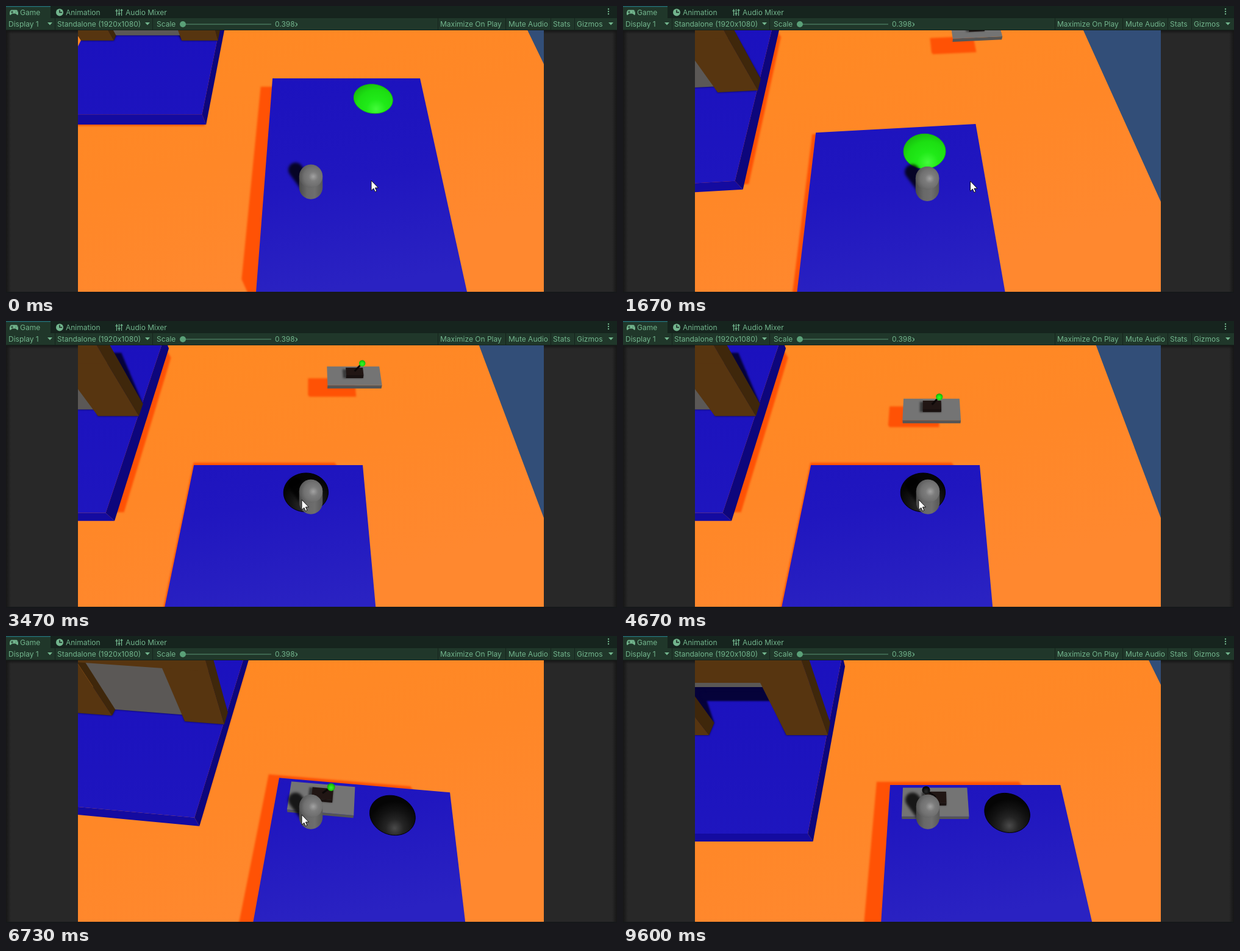
Animation, 1002 px wide and 472 px high, one loop 9.67 s. Source, as an HTML page with a canvas:

```html
<!DOCTYPE html>
<html lang="en">
<head>
<meta charset="utf-8">
<title>Game view</title>
<style>
  html, body { margin: 0; width: 100%; height: 100%; overflow: hidden; background: #282828; }
  canvas, svg { position: absolute; left: 0; top: 0; }
  text { font: 12px Inter, sans-serif; fill: #72b58d; }
</style>
</head>
<body>
<canvas id="view" width="1002" height="472"></canvas>
<svg width="1002" height="472" viewBox="0 0 1002 472">
  <defs>
    <linearGradient id="edge"><stop stop-color="#161616"/><stop offset="1" stop-color="#161616" stop-opacity="0"/></linearGradient>
    <linearGradient id="under" x2="0" y2="1"><stop stop-color="#161616"/><stop offset="1" stop-color="#161616" stop-opacity="0"/></linearGradient>
  </defs>
  <rect y="40" width="8" height="430" fill="url(#edge)"/>
  <rect y="40" width="8" height="430" fill="url(#edge)" transform="matrix(-1 0 0 1 1002 0)"/>
  <path d="M0 40h118v6H0zM882 40h120v6H882z" fill="url(#under)"/>
  <path d="M0 470h1002v2H0z" fill="#15181a"/>
  <path d="M0 0h1002v20H0z" fill="#16241e"/>
  <path d="M0 0h73v20H0zM0 20h1002v19H0z" fill="#20372a"/>
  <path d="M0 0h73v1.5H0z" fill="#236b72"/>
  <path d="M0 39h1002v1H0zM73 19h929v1H73zM80 20h1v19h-1zM240 20h1v19h-1zM708 20h1v19h-1zM819 20h1v19h-1zM893 20h1v19h-1zM932 20h1v19h-1z" fill="#15231c"/>
  <g fill="#72b58d">
    <path d="M9 6.500h8c3 0 4 8 2 8.500-1.500 0-2-2.500-3.500-2.500h-5c-1.500 0-2 2.500-3.500 2.500-2-.5-1-8.500 2-8.500z"/>
    <circle cx="88" cy="10.500" r="6"/>
    <path d="M68 27h8l-4 4.500zM228 27h8l-4 4.500zM988 27h8l-4 4.500z"/>
    <circle cx="988" cy="5" r="1.200"/><circle cx="988" cy="9" r="1.200"/><circle cx="988" cy="13" r="1.200"/>
  </g>
  <path d="M8 10h4M10 8v4M15.500 10h1M18 9h.5" stroke="#20372a" fill="none"/>
  <path d="M88 6.500v4h4" stroke="#16241e" stroke-width="1.500" fill="none"/>
  <path d="M181.500 5v11M185.500 5v11M189.500 5v11M179.500 8h4M183.500 12.500h4M187.500 7h4" stroke="#72b58d" stroke-width="1.300" fill="none"/>
  <path d="M285 30h150" stroke="#3d6650" stroke-width="2"/>
  <circle cx="290" cy="30" r="5" fill="#5aa078"/>
  <text x="23" y="15">Game</text>
  <text x="98" y="15">Animation</text>
  <text x="196" y="15">Audio Mixer</text>
  <text x="4" y="34">Display 1</text>
  <text x="84" y="34">Standalone (1920x1080)</text>
  <text x="247" y="34">Scale</text>
  <svg x="441" y="20" width="37" height="19"><text y="14">0.398x</text></svg>
  <text x="712" y="34">Maximize On Play</text>
  <text x="824" y="34">Mute Audio</text>
  <text x="897" y="34">Stats</text>
  <text x="936" y="34">Gizmos</text>
  <path id="cursor" d="M0 0V16.500L3.800 13L6.300 18.500L8.800 17.400L6.400 12H11.500Z" fill="#fff" stroke="#111"/>
</svg>
<script>
const ctx = document.getElementById('view').getContext('2d');
const cursor = document.getElementById('cursor');
const LOOP = 9670, FOCAL = 595, PITCH = 58 * Math.PI / 180;
const SIN = Math.sin(PITCH), COS = Math.cos(PITCH);
const FLOOR = -3.4, SUN_X = -0.406, SUN_Z = 0.727;

// Rows are [time, ...values].
const CAMERA = [ // x, z, yaw in degrees, height, player screen offset x, y
  [730, 2.6, -17.8, 0, 17.88, 0, 0],
  [1200, 4.83, -16.44, 4.59, 18.12, 4, -5],
  [2270, 6.84, -11.5, 2.22, 18.2, -8, 15],
  [2900, 6.93, -11.94, 0, 17.88, 0, 0],
  [5700, 6.93, -11.94, 0, 17.88, 0, 0],
  [6730, 3.115, -11.85, -5.87, 17.88, 0, 0],
  [8000, 2.18, -11.53, -0.5, 17.88, 4, 1],
  [9600, 2.22, -11.59, 0, 17.88, 0, 0]
];
const LIFT = [[2900, 9.4, 10], [4670, 5.3, 5.36], [6500, 0.76, -0.2]];
const POINTER = [
  [400, 599, 287], [400, 588, 276], [530, 588, 276], [530, 599, 287],
  [1500, 599, 287], [2150, 487, 291], [3000, 485, 294], [6900, 485, 294],
  [7300, 525, 268], [8700, 525, 268], [9300, 42, 472], [9400, 42, 490]
];

const clamp = (v, lo, hi) => Math.min(hi, Math.max(lo, v));

// Interpolates rows: straight, or smooth without overshoot.
function track(rows, t, smooth) {
  const last = rows.length - 1;
  if (t <= rows[0][0]) return rows[0].slice(1);
  if (t >= rows[last][0]) return rows[last].slice(1);
  const i = rows.findIndex(r => r[0] > t) - 1;
  const a = rows[i], b = rows[i + 1], span = b[0] - a[0], u = (t - a[0]) / span;
  const slope = (j, k) => j < 0 || j >= last ? 0 : (rows[j + 1][k] - rows[j][k]) / (rows[j + 1][0] - rows[j][0]);
  const tangent = (j, k) => {
    const p = slope(j - 1, k), q = slope(j, k);
    return p * q > 0 ? 2 * p * q / (p + q) : 0;
  };
  return a.slice(1).map((from, n) => {
    const k = n + 1, d = b[k] - from;
    if (!smooth) return from + d * u;
    return from + d * u * u * (3 - 2 * u)
      + span * u * (1 - u) * ((1 - u) * tangent(i, k) - u * tangent(i + 1, k));
  });
}

let cam;
function project([x, y, z]) {
  const dx = x - cam.x, dy = y - cam.h, dz = z - cam.z;
  const c = Math.cos(cam.yaw), s = Math.sin(cam.yaw);
  const side = dx * c - dz * s, ahead = dx * s + dz * c;
  const scale = FOCAL / (ahead * COS - dy * SIN);
  return { x: 500 + side * scale, y: 255 - (dy * COS + ahead * SIN) * scale, scale };
}

function trace(points) {
  ctx.beginPath();
  for (const p of points) {
    const q = project(p);
    ctx.lineTo(q.x, q.y);
  }
  ctx.closePath();
}

function face(points, fill) {
  trace(points);
  ctx.fillStyle = fill;
  ctx.fill();
}

const flat = (r, y) => [[r.x0, y, r.z0], [r.x1, y, r.z0], [r.x1, y, r.z1], [r.x0, y, r.z1]];

function box(r, y0, y1, [top, front, right]) {
  if (cam.x > r.x1) face([[r.x1, y0, r.z0], [r.x1, y1, r.z0], [r.x1, y1, r.z1], [r.x1, y0, r.z1]], right);
  if (cam.z < r.z0) face([[r.x0, y0, r.z0], [r.x1, y0, r.z0], [r.x1, y1, r.z0], [r.x0, y1, r.z0]], front);
  face(flat(r, y1), top);
}

// Shadow of a box whose bottom and top lie low and high above the ground.
function shadow(r, low, high, ground, color) {
  const at = (x, z, h) => [x + SUN_X * h, ground, z + SUN_Z * h];
  ctx.filter = 'blur(1.5px)';
  face([at(r.x0, r.z0, low), at(r.x1, r.z0, low), at(r.x1, r.z1, low),
    at(r.x1, r.z1, high), at(r.x0, r.z1, high), at(r.x0, r.z0, high)], color);
  ctx.filter = 'none';
}

function gradient(x0, y0, x1, y1, ...colors) {
  const g = ctx.createLinearGradient(x0, y0, x1, y1);
  colors.forEach((c, i) => g.addColorStop(i / (colors.length - 1), c));
  return g;
}

function glow(x, y, r, ...colors) {
  const g = ctx.createRadialGradient(x, y, 0, x, y, r);
  colors.forEach((c, i) => g.addColorStop(i / (colors.length - 1), c));
  return g;
}

const MAIN = { x0: 0, x1: 10, z0: -15, z1: 0 };
const YARD = { x0: -14.28, x1: -4.28, z0: -3.14, z1: 11.8 };
const GATE = { x0: -14.28, x1: -4.22, z0: 3.84, z1: 4.9 };
const LEFT_POST = { ...GATE, x1: -11.86 }, RIGHT_POST = { ...GATE, x0: -6.88 };
const DOOR = { x0: -11.86, x1: -6.88, z0: 4.4, z1: 4.6 };
const BROWN = ['#5c3813', '#573510', '#3f270b'];
const GATE_TOP = 7, OPENING = 4.3;

function drawYard(open) {
  const blue = gradient(0, 40, 0, 470, '#1b11be', '#2018bf');
  const raised = 3.5 * open, dark = 'rgba(0,0,0,.78)';
  box(YARD, -1.05, 0, [blue, '#140ba0', '#0d067c']);
  ctx.save();
  trace(flat(YARD, 0));
  ctx.clip();
  ctx.beginPath();
  ctx.save();
  shadow(GATE, OPENING, GATE_TOP, 0, '#05023a');
  shadow(LEFT_POST, 0, OPENING, 0, '#05023a');
  shadow(RIGHT_POST, 0, OPENING, 0, '#05023a');
  shadow(DOOR, raised, OPENING, 0, '#05023a');
  ctx.restore();
  ctx.restore();
  box(LEFT_POST, 0, GATE_TOP, BROWN);
  box(DOOR, raised, raised + OPENING, ['#666', '#5b5856', '#444']);
  box(RIGHT_POST, 0, GATE_TOP, BROWN);
  face([[GATE.x0, OPENING, GATE.z0], [GATE.x1, OPENING, GATE.z0],
    [GATE.x1, GATE_TOP, GATE.z0], [GATE.x0, GATE_TOP, GATE.z0]], BROWN[1]);
}

function drawButton(pressed) {
  const center = [6.65, 0.05, -1.85], r = 1.26;
  const c = project(center), size = r * c.scale;
  const rim = Array.from({ length: 48 }, (_, i) => {
    const a = i * Math.PI / 24;
    return [center[0] + r * Math.cos(a), center[1], center[2] + r * Math.sin(a)];
  });
  face(rim, pressed
    ? glow(c.x + size * 0.1, c.y + size * 0.6, size * 1.2, '#4a4a4a', '#242424', '#121212', '#050505')
    : glow(c.x + size * 0.15, c.y + size * 0.55, size * 1.5, '#43fb3a', '#20ea18', '#1cdf12', '#16b60d'));
  ctx.strokeStyle = pressed ? '#000' : '#17b90d';
  ctx.lineWidth = 1;
  ctx.stroke();
}

function drawLift(rect, swing) {
  const { x0, z1 } = rect;
  box(rect, -0.28, 0.02, ['#747474', '#555', '#484848']);
  const bench = { x0: x0 + 1.3, x1: x0 + 2.5, z0: z1 - 1.2, z1: z1 - 0.45 };
  ctx.filter = 'blur(1.5px)';
  face(flat({ ...bench, x0: bench.x0 - 0.2, z1: bench.z1 + 0.15 }, 0.02), 'rgba(0,0,0,.5)');
  ctx.filter = 'none';
  box(bench, 0.02, 0.3, ['#211614', '#191110', '#100a09']);
  const foot = project([x0 + 1.9, 0.3, z1 - 0.8]);
  const knob = project([x0 + 2.36 - swing, 0.95, z1 - 0.75]);
  ctx.beginPath();
  ctx.moveTo(foot.x, foot.y);
  ctx.lineTo(knob.x, knob.y);
  ctx.strokeStyle = '#0c0808';
  ctx.lineWidth = 3;
  ctx.stroke();
  ctx.beginPath();
  ctx.arc(knob.x, knob.y, 0.22 * knob.scale, 0, 7);
  ctx.fillStyle = swing > 0 ? glow(knob.x, knob.y + 2, 7, '#2a2a2a', '#050505')
    : glow(knob.x, knob.y + 1, 7, '#3cf52c', '#1ede12', '#129a0a');
  ctx.fill();
}

function capsule(x0, y0, x1, y1, width, style) {
  ctx.beginPath();
  ctx.moveTo(x0, y0);
  ctx.lineTo(x1, y1);
  ctx.lineCap = 'round';
  ctx.lineWidth = width;
  ctx.strokeStyle = style;
  ctx.stroke();
}

function drawPlayer(x, y) {
  ctx.filter = 'blur(2px)';
  capsule(x - 8, y + 4, x - 25, y - 19, 24, 'rgba(0,0,0,.8)');
  ctx.filter = 'none';
  capsule(x, y + 10, x, y - 8.5, 38.5, gradient(x - 19, 0, x + 19, 0, '#4a4a4a', '#686868', '#6e6e6e', '#585858'));
  ctx.beginPath();
  ctx.arc(x, y - 8.5, 19.25, 0, 7);
  ctx.fillStyle = glow(x + 4, y - 8, 23, '#a2a2a2', '#7c7c7c', '#707070', 'rgba(92,92,92,.5)');
  ctx.fill();
}

function draw(t) {
  const [x, z, yaw, h, px, py] = track(CAMERA, t, true);
  cam = { x, z, h, yaw: yaw * Math.PI / 180 };
  const [liftX, liftZ] = track(LIFT, t);
  const lift = { x0: liftX, x1: liftX + 3.75, z0: liftZ - 1.9, z1: liftZ };
  const open = clamp((t - 7000) / 2000, 0, 1);

  ctx.fillStyle = '#282828';
  ctx.fillRect(0, 0, 1002, 472);
  ctx.save();
  ctx.beginPath();
  ctx.rect(118, 40, 764, 430);
  ctx.clip();
  ctx.fillStyle = '#324e78';
  ctx.fillRect(118, 40, 764, 430);
  face(flat({ x0: -70, x1: 21.95, z0: -25, z1: 90 }, FLOOR),
    gradient(300, 40, 420, 470, '#ff8923', '#ff8727', '#ff882f'));
  shadow(YARD, 2.35, 3.4, FLOOR, '#ff5205');
  shadow(MAIN, 2.35, 3.4, FLOOR, '#ff5205');
  shadow(lift, 3.12, 3.4, FLOOR, '#ff5205');
  drawYard(open);
  face(flat(MAIN, 0), gradient(450, 120, 500, 470, '#1c12be', '#2016bf', '#2a22c2'));
  drawLift(lift, open);
  drawButton(t >= 2000);
  drawPlayer(500 + px, 288.5 + py);
  ctx.restore();

  const [cx, cy] = track(POINTER, t);
  cursor.setAttribute('transform', `translate(${cx} ${cy})`);
}

const start = performance.now();
function tick() {
  draw((performance.now() - start) % LOOP);
  requestAnimationFrame(tick);
}
tick();
</script>
</body>
</html>
```
